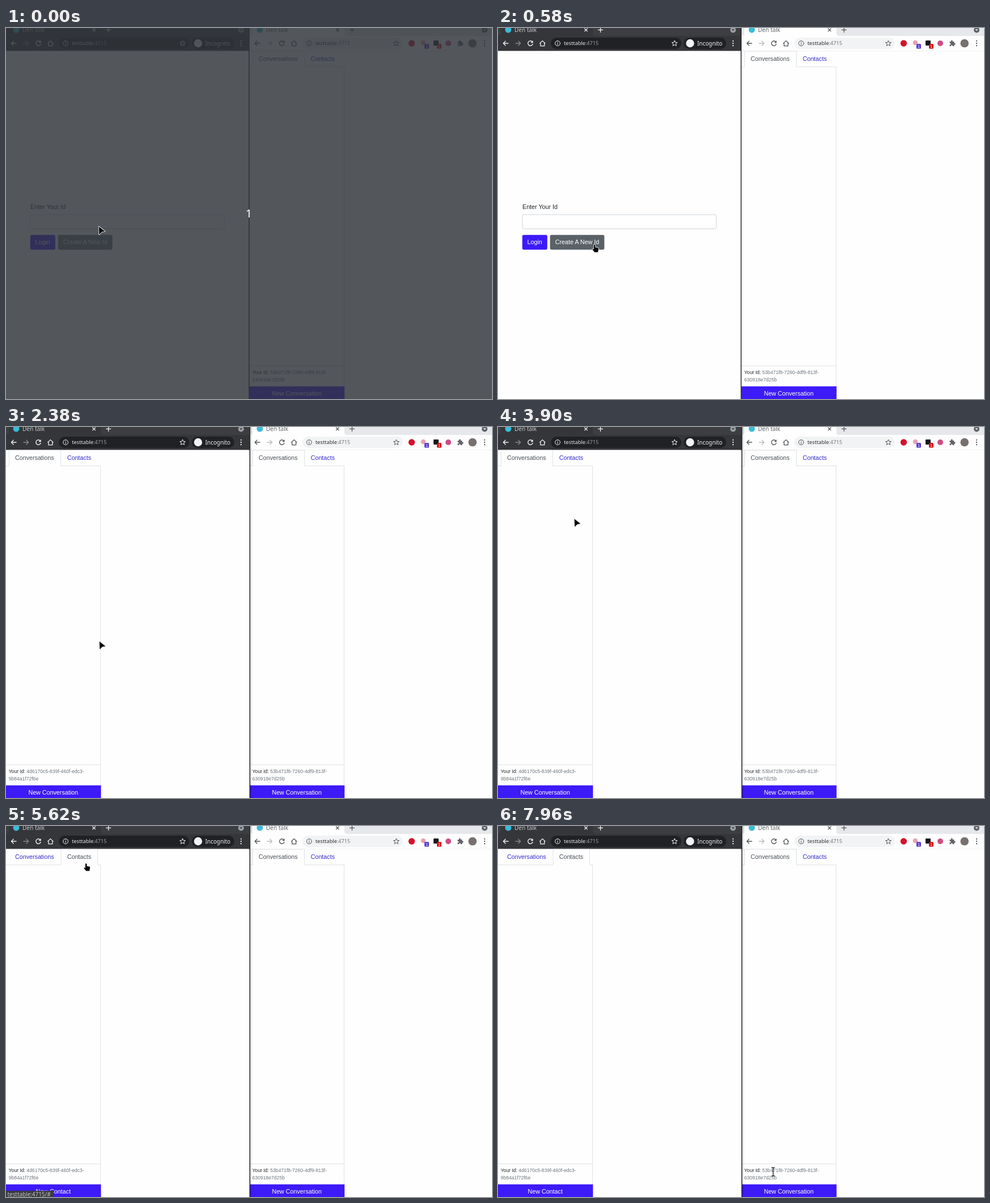
Animation of 856 by 654 pixels, one loop 8000 ms. Source, as an HTML page:

```html
<!DOCTYPE html>
<html lang="en">
<head>
<meta charset="utf-8">
<title>Two chat windows</title>
<style>
  html, body { margin: 0; width: 100%; height: 100%; overflow: hidden; background: #fefefe; }
  svg { display: block; width: 856px; height: 654px; }
  text { font: 10.72px "Liberation Sans", Arial, sans-serif; white-space: pre; }
  .small { font-size: 8.58px; }
  .ui { font-family: "Noto Sans", "Open Sans", sans-serif; }
  .mid { text-anchor: middle; }
</style>
</head>
<body>
<svg id="stage" viewBox="0 0 856 654"></svg>
<script>
const LOOP = 8000;
const TOP = 40.6;
const PURPLE = '#3d1af8', LINK = '#352cd2', INK = '#212529', BORDER = '#dee2e6';

const rect = (x, y, w, h, fill, more = '') =>
  `<rect x="${x}" y="${y}" width="${w}" height="${h}" fill="${fill}" ${more}/>`;
const dot = (x, y, r, fill, more = '') =>
  `<circle cx="${x}" cy="${y}" r="${r}" fill="${fill}" ${more}/>`;
const line = (d, color, w = 1, more = '') =>
  `<path d="${d}" fill="none" stroke="${color}" stroke-width="${w}" ${more}/>`;
const text = (x, y, s, fill, cls = '', size = 0) =>
  `<text x="${x}" y="${y}" fill="${fill}" class="${cls}" ${size ? `style="font-size:${size}px"` : ''}>${s}</text>`;
const group = (id, body, more = '') => `<g id="${id}" ${more}>${body}</g>`;

// Tab strip, toolbar and address bar of one browser window
function browser(dark) {
  const c = dark
    ? { strip: '#3d3e41', bar: '#35363a', pill: '#202124', icon: '#f1f3f4', off: '#85878a', text: '#e8eaed', port: '#9aa0a6', title: '#c4c7ca' }
    : { strip: '#e6e8eb', bar: '#fefefe', pill: '#f1f3f4', icon: '#505357', off: '#b9bcbf', text: '#2b2d30', port: '#74787c', title: '#606368' };
  const star = dark ? 311 : 258.5;
  const arrow = (x, dir, color) =>
    line(`M${x - 4.5} 27H${x + 4.5}M${x + dir * .5} 22.7L${x + dir * 4.6} 27L${x + dir * .5} 31.3`, color, 1.3);
  return rect(0, 0, 429, TOP, c.bar)
    + rect(0, 0, 5, 13, c.strip, 'rx="2"')
    + `<path d="M167 0H429V14H172Q167 14 167 9Z" fill="${c.strip}"/>`
    + dot(18, 3, 5.5, '#38bcd8')
    + text(29, 7, 'Den talk', c.title, 'ui', 10.1)
    + line('M152.2 .7L157.6 6.1M157.6 .7L152.2 6.1', c.icon, 1.3)
    + line('M176 3.4H185M180.5 -1V8', c.icon, 1.3)
    + dot(414, 3.5, 5, dark ? '#9aa0a6' : '#5f6368')
    + `<path d="M411.5 2.3H416.5L414 5.3Z" fill="${c.strip}"/>`
    + arrow(14, -1, c.icon) + arrow(35, 1, c.off)
    + line('M60.6 24.6A4.3 4.3 0 1 0 61.2 28', c.icon, 1.4)
    + `<path d="M61.6 22V26.2H57.4Z" fill="${c.icon}"/>`
    + line('M73.2 27.4L78.3 22.6L83.4 27.4M74.9 26.5V31.6H81.7V26.5', c.icon, 1.3)
    + rect(93, 17, dark ? 230 : 177, 20, c.pill, 'rx="10"')
    + dot(105, 27, 4.4, 'none', `stroke="${c.icon}"`)
    + line('M105 26.5V29.5M105 24.3V25.5', c.icon, 1.1)
    + text(116, 30.4, `testtable<tspan fill="${c.port}">:4715</tspan>`, c.text, 'ui', 9.2)
    + `<path d="M0 -5L1.4 -1.6L5 -1.4L2.2 .9L3.1 4.4L0 2.5L-3.1 4.4L-2.2 .9L-5 -1.4L-1.4 -1.6Z" transform="translate(${star} 27)" fill="none" stroke="${c.icon}"/>`
    + [22.8, 27, 31.2].map(y => dot(414, y, 1.15, c.icon)).join('');
}

const badge = (x, fill) => rect(x - 4, 28, 8, 8.5, fill, 'rx="1.5"') + text(x, 35, '1', '#fff', 'mid', 7.5);

const extras = dot(714.5, 27, 5.7, '#d5122b')
  + dot(735, 26, 4.3, '#e5a3ad') + badge(741, '#5b3bd0')
  + rect(753, 22, 9, 9, '#17171a', 'rx="1"') + badge(763, '#d8101c')
  + dot(779, 27, 5, '#cf4b86')
  + '<path d="M795.5 24H798Q797.4 21.6 799.3 21.6T800.7 24H803.4V26.7Q805.6 26 805.6 28T803.4 29.4V32H800.6Q800.7 30 799.3 30T798 32H795.5V29.3Q797.6 29.4 797.6 28T795.5 26.7Z" fill="#5f6368"/>'
  + dot(821.7, 27, 7.3, '#77706e');

// Sidebar with its two tabs; the contacts state is used on the left only
function sidebar(key, id1, id2) {
  const label = (x, s, color) => text(x, 57.8, s, color);
  return rect(0, TOP, 427, 654 - TOP, '#fefefe')
    + line('M166.5 68V632M0 595.5H167', BORDER)
    + group(key + 'Conv',
        line('M0 68.5H5.5V41H96.5V68.5H167', BORDER)
        + label(16, 'Conversations', '#495057') + label(107.7, 'Contacts', LINK))
    + group(key + 'Cont',
        line('M0 68.5H97V41H161.5V68.5H167', BORDER)
        + label(16, 'Conversations', LINK) + label(107.7, 'Contacts', '#495057'), 'display="none"')
    + text(4.7, 610.4, `Your Id: <tspan fill="#6c757d">${id1}</tspan>`, INK, 'small')
    + text(4.7, 623.2, id2, '#6c757d', 'small')
    + rect(0, 631.7, 167.3, 23, PURPLE)
    + `<text id="${key}Btn" x="83.2" y="648" fill="#fff" class="mid">New Conversation</text>`;
}

const login = rect(0, TOP, 429, 654 - TOP, '#fefefe')
  + text(43, 318.8, 'Enter Your Id', INK)
  + rect(43, 329, 341.5, 25, '#fff', 'rx="2.7" stroke="#ced4da"')
  + rect(42.8, 364.7, 44, 26, PURPLE, 'rx="2.7"')
  + rect(91.7, 364.7, 95.6, 26, '#6c757d', 'rx="2.7" id="create"')
  + text(64.7, 381.3, 'Login', '#fff', 'mid') + text(139.5, 381.3, 'Create A New Id', '#fff', 'mid');

const pointers = group('arrow', '<path d="M0 0L10.8 8.4L5.2 9.4L.6 14Z" fill="#080808" stroke="#fff" stroke-width="1.6" paint-order="stroke" stroke-linejoin="round"/>')
  + group('hand', '<path d="M4 0Q5.4 0 5.4 1.5V4.7L9.8 5.6Q11.2 6 11 7.6L10 13.2H4.2L.4 8.8Q-.2 7.2 1.4 7.3L2.7 8.2V1.4Q2.7 0 4 0Z" fill="#080808" stroke="#fff" stroke-width="1.6" paint-order="stroke"/>')
  + group('beam', line('M-3 -7.3H-1Q0 -7.3 0 -6.3V6.3Q0 7.3 -1 7.3H-3M3 -7.3H1Q0 -7.3 0 -6.3M0 6.3Q0 7.3 1 7.3H3', '#111', 1.2));

document.getElementById('stage').innerHTML =
  '<defs><linearGradient id="fade"><stop offset="0" stop-color="#000" stop-opacity=".16"/><stop offset="1" stop-color="#000" stop-opacity="0"/></linearGradient></defs>'
  + rect(0, 0, 856, 654, '#fefefe')
  + browser(true)
  + rect(327, 17, 75, 20, '#202124', 'rx="10"') + dot(338.3, 27, 7.2, '#f1f3f4')
  + text(351, 30.5, 'Incognito', '#f1f3f4', 'ui', 9.85)
  + group('login', login)
  + group('left', sidebar('l', '4d6170c5-839f-460f-edc3-', '9b84a1f72f6e')
    + line('M97 68V41H161.5V68', '#e9ecef', 1, 'id="hover"'))
  + group('status', '<path d="M0 643H80Q83.5 643 83.5 646V654H0Z" fill="#3a3b3f"/>'
    + text(2.5, 652.8, 'testtable:4715/#', '#c3c6ca', 'ui', 9.9))
  + group('right', browser(false) + line('M0 40.5H429', '#e6e8ea')
    + sidebar('r', '53b471f8-7260-4df9-813f-', '630918e7d25b'), 'transform="translate(429 0)"')
  + extras
  + rect(430, 0, 4, 654, 'url(#fade)', 'id="shadow"')
  + rect(427.5, 0, 1.5, 654, '#26272a', 'id="edge"')
  + group('dim', rect(0, 0, 856, 654, 'rgb(49,52,58)', 'opacity=".83"')
    + '<svg x="400" y="300" width="30" height="50">' + text(22, 34, '1', '#fff', 'ui', 20) + '</svg>')
  + pointers;

const $ = id => document.getElementById(id);
const show = (id, on) => $(id).setAttribute('display', on ? 'inline' : 'none');

// Pointer stops: time, shape, x, y
const stops = [
  [0, 'arrow', 163.5, 350], [160, 'hand', 160, 351], [300, 'hand', 162, 370],
  [580, 'hand', 166, 382], [1140, 'hand', 173, 382], [1420, 'hand', 164, 379],
  [1700, 'hand', 160, 377.5], [2380, 'arrow', 164.5, 378], [2500, 'arrow', 256, 369.5],
  [2780, 'arrow', 315.5, 369.5], [3340, 'arrow', 315.5, 368.5], [3620, 'arrow', 223.5, 308],
  [3900, 'arrow', 134.5, 162], [4180, 'arrow', 178.5, 112], [4460, 'hand', 141, 66],
  [4740, 'hand', 128, 57], [5020, 'hand', 127, 56], [5620, 'hand', 137, 66],
  [5740, 'arrow', 140.5, 66.5], [5880, 'arrow', 302, 176.5], [6180, 'arrow', 457, 372.5],
  [6460, 'arrow', 456.5, 379.5], [6700, 'arrow', 555.5, 510.5], [7000, 'arrow', 543, 563.5],
  [7400, 'arrow', 533.5, 588.5], [7580, 'beam', 494, 591], [7700, 'beam', 494, 605.5],
  [7960, 'beam', 484.6, 609.5]
];
// Opacity of the link hint: time, value
const hint = [[0, 0], [5300, .35], [5380, .7], [5440, 1], [6700, .8], [6860, .5], [7000, .25], [7120, 0]];
const createFill = [[0, '#6c757d'], [300, '#666f76'], [380, '#5f686e'], [460, '#5a6268'], [1980, '#545b62']];
const at = (table, t) => table.filter(row => row[0] <= t).pop();

function draw(t) {
  const [, shape, x, y] = at(stops, t);
  for (const id of ['arrow', 'hand', 'beam']) show(id, id === shape);
  $(shape).setAttribute('transform', `translate(${x} ${y})`);

  show('dim', t < 160);
  show('login', t < 2380);
  show('left', t >= 2380);

  const clicked = t >= 1980;
  const create = $('create');
  create.setAttribute('fill', at(createFill, t)[1]);
  create.setAttribute('stroke', clicked ? 'rgba(130,138,145,.5)' : 'none');
  create.setAttribute('stroke-width', 4);
  create.setAttribute('paint-order', 'stroke');
  show('shadow', clicked);
  $('edge').setAttribute('x', clicked ? 428.7 : 427.5);

  const contacts = t >= 5180;
  show('lConv', !contacts);
  show('lCont', contacts);
  show('hover', t >= 4460 && !contacts);
  $('lBtn').textContent = contacts ? 'New Contact' : 'New Conversation';
  $('status').setAttribute('opacity', at(hint, t)[1]);
}

const start = performance.now();
function tick() {
  draw((performance.now() - start) % LOOP);
  requestAnimationFrame(tick);
}
tick();
</script>
</body>
</html>
```
